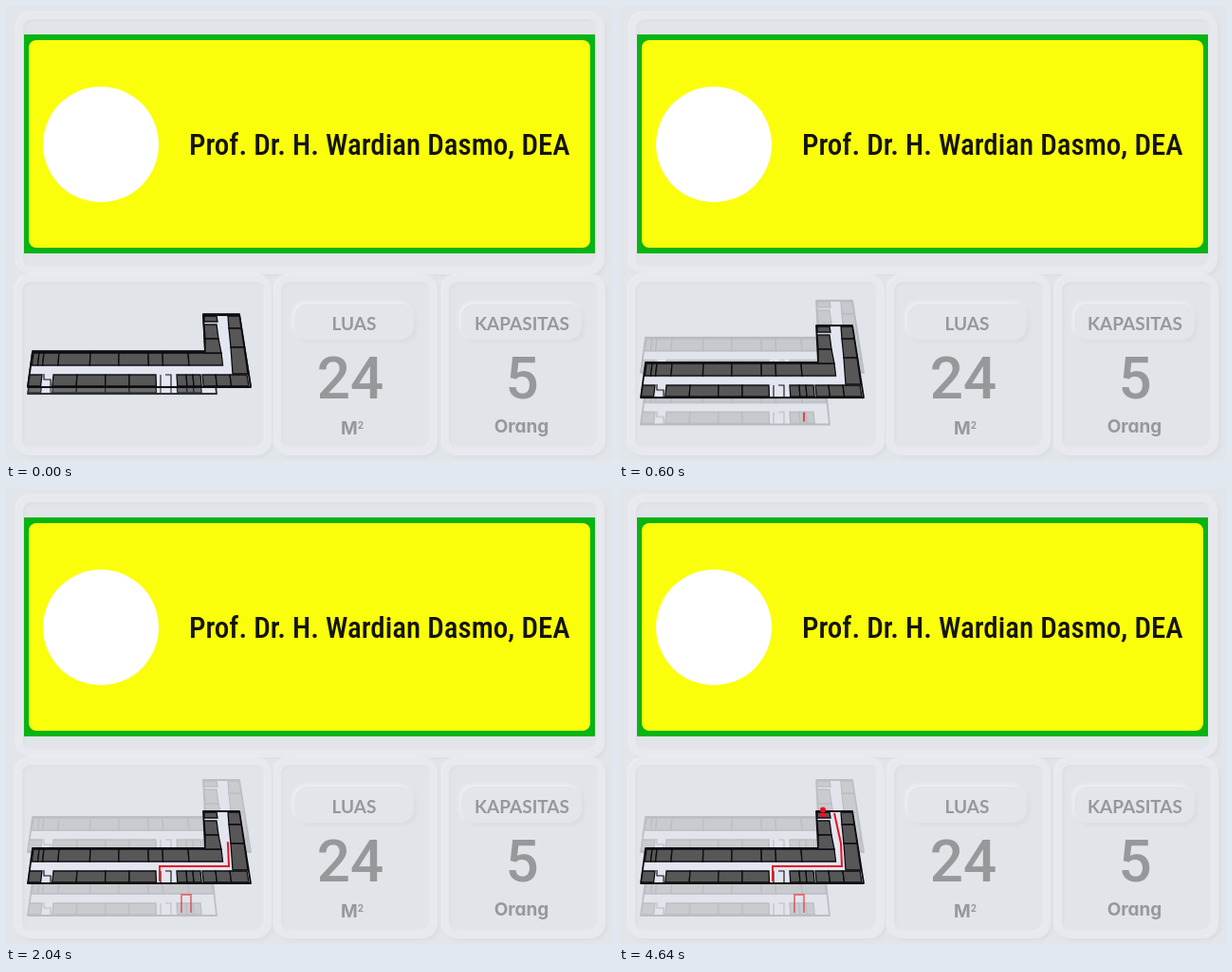
These frames come from a looping animation (640x480 px, 5.12 s). An HTML page:

```html
<!DOCTYPE html>
<html lang="id">
<head>
<meta charset="utf-8">
<title>Ruang</title>
<style>
html, body { margin: 0; width: 100%; height: 100%; overflow: hidden; background: #e2e5ea; }
#stage { position: relative; width: 640px; height: 480px; overflow: hidden; }
.panel, .pill { position: absolute; box-sizing: border-box; }
.panel {
  border: 7px solid #e7e9ee; border-radius: 16px; background: #e1e4e9;
  box-shadow: -1px -1px 3px #eff1f4, 2px 2px 4px #d8dbe1, inset 1px 1px 3px #d9dce2, inset -1px -1px 3px #eff1f4;
}
.pill {
  border-radius: 14px; background: #e2e5ea;
  box-shadow: -2px -2px 4px #eff1f4, 2px 2px 4px #d7dae0;
}
svg { position: absolute; left: 0; top: 0; }
text { text-anchor: middle; fill: #97989a; }
.label { font: 700 19px Lato, sans-serif; }
.unit { font: 700 19px Inter, sans-serif; font-feature-settings: "cv11"; }
.value { font: 500 62px Roboto, sans-serif; }
.name {
  font: 500 31px "Roboto Condensed", Roboto, sans-serif; font-stretch: 75%;
  text-anchor: start; fill: #14140a;
}
.floor { fill: #e3e5f0; stroke: #0c0c10; stroke-width: 1.8; stroke-linejoin: round; }
.room { fill: #575757; stroke: #0c0c10; stroke-width: 1.3; }
.wall { fill: none; stroke: #0c0c10; stroke-width: 1.1; }
.route { fill: none; stroke: #e8141e; stroke-width: 2; stroke-dasharray: 1 1; }
</style>
</head>
<body>
<div id="stage">
  <svg id="art" width="640" height="480" viewBox="0 0 640 480">
    <rect x="19" y="30" width="602" height="231" fill="#06b414"/>
    <rect x="24" y="36" width="592" height="219" rx="8" fill="#fbfe0a"/>
    <circle cx="100" cy="146" r="61" fill="#fff"/>
    <text id="name" class="name" x="193" y="157">Prof. Dr. H. Wardian Dasmo, DEA</text>
    <text class="label" x="367" y="342">LUAS</text>
    <text class="value" x="363" y="414">24</text>
    <text class="unit" x="365" y="452">M<tspan font-size="10" dy="-6">2</tspan></text>
    <text class="label" x="544" y="342">KAPASITAS</text>
    <text class="value" x="544" y="414">5</text>
    <text class="unit" x="543.5" y="450">Orang</text>
    <g id="ground"></g>
    <g id="upper"></g>
    <g id="middle"></g>
  </svg>
</div>
<script>
const LOOP = 5120;
const stage = document.getElementById('stage');
const art = document.getElementById('art');
const byId = id => document.getElementById(id);

function box(cls, x, y, w, h) {
  const div = document.createElement('div');
  div.className = cls;
  div.style.cssText = `left:${x}px;top:${y}px;width:${w}px;height:${h}px`;
  stage.insertBefore(div, art);
}
box('panel', 11, 7, 620, 276);
box('panel', 10, 284, 270, 190);
box('panel', 283, 284, 172, 190);
box('panel', 460, 284, 172, 190);
box('pill', 304, 314, 126, 38);
box('pill', 480, 314, 127, 38);

function shape(parent, tag, attrs) {
  const el = document.createElementNS('http://www.w3.org/2000/svg', tag);
  for (const key in attrs) el.setAttribute(key, attrs[key]);
  return parent.appendChild(el);
}
const path = (parent, cls, d) => shape(parent, 'path', { class: cls, d });

// Rooms between neighbouring cuts; the lower edge leans outwards.
function row(parent, cuts, top, bottom) {
  const lean = x => x + (x - 130) * 0.016;
  cuts.slice(1).forEach((right, i) => {
    const left = cuts[i];
    path(parent, 'room', `M${left} ${top}H${right}L${lean(right)} ${bottom}H${lean(left)}Z`);
  });
}

function building(parent, hasWing) {
  path(parent, 'floor', hasWing
    ? 'M28 379H210L208 340H246L258 416H23Z'
    : 'M28 379H218L222 416H23Z');
  row(parent, [29, 35, 40, 56, 89, 119, 150, 165, 192].concat(hasWing ? 227 : 217), 380, 393);
  row(parent, [25, 38], 403, 415);
  row(parent, [50, 75, 105, 130, 158], 403, 415);
  row(parent, [180, 190, 197, 205], 403, 415);
  path(parent, 'wall', 'M40 402V408H47V415M163 403V415M168 403H174V415');
  if (!hasWing) return;
  row(parent, [207, 221, 236, 254], 403, 415);
  path(parent, 'room', 'M209 341H222L223 347H209Z');
  path(parent, 'room', 'M209 350H222L224 365H210Z');
  path(parent, 'room', 'M210 365H224L227 380H210Z');
  path(parent, 'room', 'M234 341H246L248 354H235Z');
  path(parent, 'room', 'M235 354H248L251 374H237Z');
  path(parent, 'room', 'M237 374H251L255 402H239Z');
}

const ground = byId('ground'), upper = byId('upper'), middle = byId('middle');
const groundPlan = shape(ground, 'g', {});
building(groundPlan, false);
building(upper, true);
building(middle, true);

function route(parent, d) {
  const el = path(parent, 'route', d);
  el.setAttribute('pathLength', 1);
  return el;
}
const entry = route(ground, 'M195 413V394H185V413');
const walk = route(middle, 'M162 414V398H235L234 374L227 342');
const pin = shape(middle, 'g', { fill: '#e8141e' });
shape(pin, 'circle', { cx: 215, cy: 338.5, r: 3 });
path(pin, '', 'M211.5 346V343Q215 340 218.5 343V346Z');

// Steps are [time in ms, value]; the last value holds to the end of the loop.
function play(el, prop, steps, format = v => v) {
  const last = steps[steps.length - 1][1];
  const frames = [...steps, [LOOP, last]]
    .map(([ms, v]) => ({ offset: ms / LOOP, [prop]: format(v) }));
  el.animate(frames, { duration: LOOP, iterations: Infinity });
}
const shift = y => `translateY(${y}px)`;
const ghost = [[0, 0.85], [120, 0.34], [400, 0.22], [760, 0.17]];

play(upper, 'transform', [[0, -15], [760, -33]], shift);
play(middle, 'transform', [[0, -14], [760, 0]], shift);
play(ground, 'transform', [[0, -7], [760, 34]], shift);
play(upper, 'opacity', ghost);
play(groundPlan, 'opacity', ghost);
play(entry, 'strokeDashoffset', [[0, 1], [560, 1], [760, 0]]);
play(entry, 'opacity', [[0, 0], [559, 0], [560, 0.75], [960, 0.75], [1480, 0.5]]);
play(walk, 'strokeDashoffset', [[0, 1], [1600, 1], [2160, 0]]);
play(walk, 'opacity', [[0, 0], [1600, 0], [1640, 1]]);
play(pin, 'opacity', [[0, 0], [2200, 0], [2560, 1]]);

// Keep the title inside its line when no condensed face is available.
const title = byId('name');
const width = title.getComputedTextLength();
if (width > 404) title.style.fontSize = 31 * 400 / width + 'px';
</script>
</body>
</html>
```
